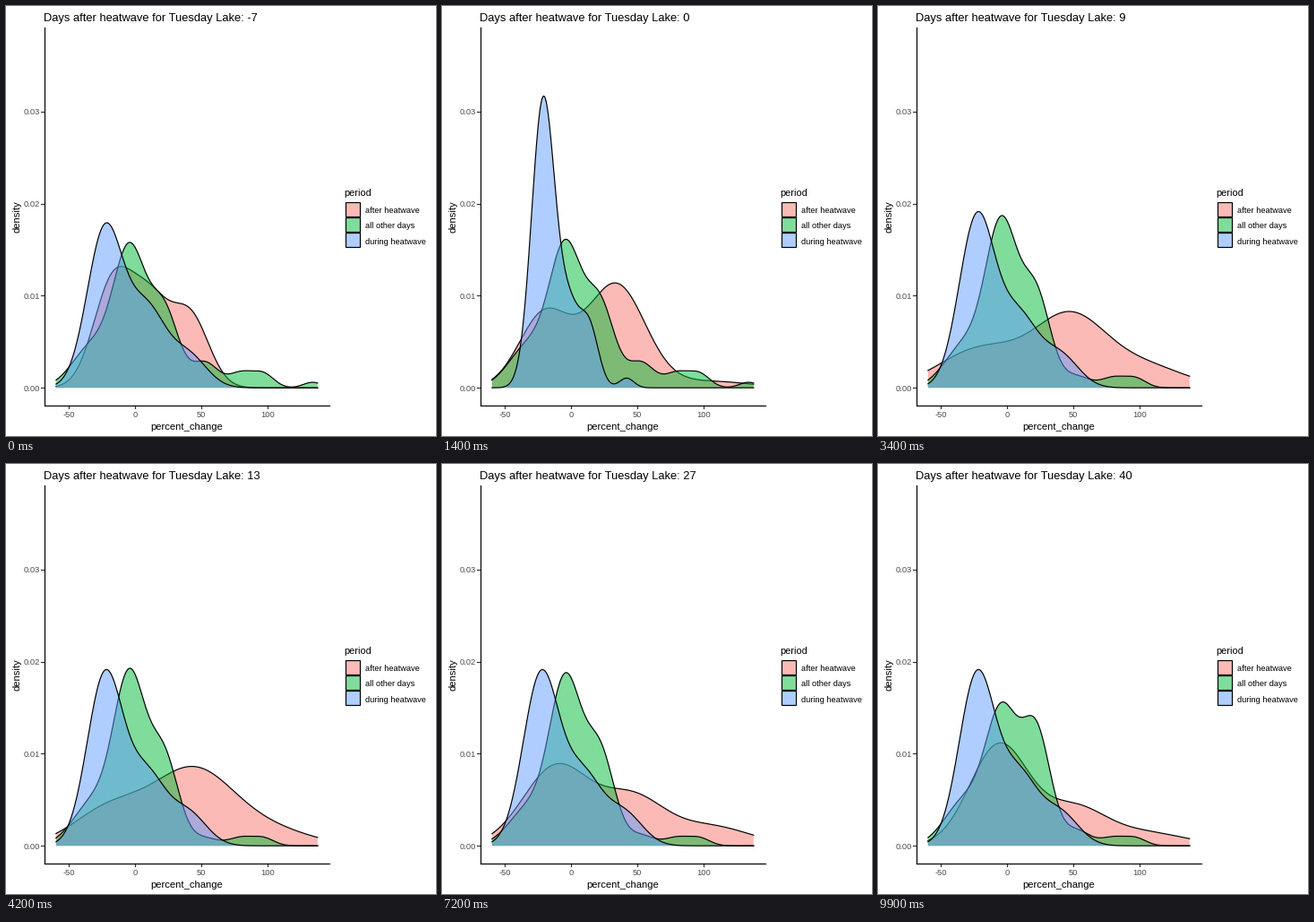
Animation of 480 by 480 pixels, one loop 10 s. Source, as a matplotlib script:

```python
import numpy as np
import matplotlib.pyplot as plt
from matplotlib.animation import FuncAnimation
from matplotlib.patches import Polygon, Rectangle

FRAMES, STEP_MS = 100, 100
FIRST_DAY, LAST_DAY = -7, 40
PX = 0.9  # points per pixel at 80 dpi
GREY = "#4D4D4D"
GRID = np.linspace(-59.5, 137.8, 512)

plt.rcParams["font.family"] = "Liberation Sans"


def hills(*bumps):
    """Sum of Gaussian bumps (height, mean, sd); heights in units of 0.0001."""
    return sum(h * np.exp(-((GRID - m) / sd) ** 2 / 2) for h, m, sd in bumps)


def after(early, late, tail):
    return hills(early, late, (tail, 105, 30))


def other(left, main, right, mid, far):
    return hills((left, -32, 15), (main, -4, 12), (right, 22, 11), (mid, 53, 10),
                 (far, 80, 9), (0.9 * far, 97, 8))


def during_wide(peak, second):
    return hills((peak, -22.5, 13.5), (second, 9, 14), (35, 40, 14))


def during_narrow(peak, sd):
    return hills((peak, -20.8, sd), (78, -1, 8), (62, 14, 7), (10.5, 42, 5.5))


last_bump = hills((6, 134, 7))

# Density shapes at key steps; steps between them are blended.
AFTER = {
    0: hills((110, -17, 14.5), (90, 11, 15), (75, 42, 14)),
    14: after((80, -20, 19), (112, 34, 22), 7),
    26: after((42, -25, 33), (72, 49, 25), 29),
    42: after((38, -20, 27), (82, 44, 31), 15),
    56: after((72, -3, 27), (53, 52, 24), 23),
    72: after((86, -11, 25), (50, 46, 24), 21),
    99: after((109, -6, 22), (40, 50, 24), 14),
}
OTHER = {
    0: other(45, 145, 82, 27, 16) + last_bump,
    14: other(45, 148, 88, 27, 16) + last_bump,
    26: other(45, 167, 104, 16, 13),
    42: other(46, 179, 93, 8, 9),
    56: other(46, 163, 95, 14, 8),
    72: other(40, 175, 98, 11, 9),
    99: other(48, 140, 123, 16, 9),
}
DURING = {
    0: during_wide(172, 82),
    12: during_narrow(365, 7.8),
    14: during_narrow(313, 8.8),
    22: during_wide(185, 74),
    99: during_wide(185, 74),
}
PERIODS = [
    ("after heatwave", "#F8766D", AFTER),
    ("all other days", "#00BA38", OTHER),
    ("during heatwave", "#619CFF", DURING),
]


def blend(shapes, step):
    keys = list(shapes)
    i = min(np.searchsorted(keys, step, side="right"), len(keys) - 1)
    a, b = keys[i - 1], keys[i]
    f = (step - a) / (b - a)
    return shapes[a] * (1 - f) + shapes[b] * f


def to_x(v):
    return 143.9 + 1.48 * v


def to_y(d):
    return 426.2 - 1.028 * d


fig = plt.figure(figsize=(6, 6), dpi=80, facecolor="white")
ax = fig.add_axes([0, 0, 1, 1])
ax.set(xlim=(0, 480), ylim=(480, 0))
ax.axis("off")


def label(x, y, s, size, color="black", **kw):
    return ax.text(x, y, s, fontsize=size * PX, color=color, **kw)


def stroke(xs, ys, color="black", **kw):
    return ax.plot(xs, ys, color=color, lw=1.2 * PX, **kw)[0]


layers = []
for i, (name, color, shapes) in enumerate(PERIODS):
    area = Polygon([[0, 0], [1, 1], [1, 0]], fc=color, alpha=0.5, lw=0, zorder=2 * i + 2)
    ax.add_patch(area)
    layers.append((shapes, area, stroke([], [], zorder=2 * i + 3)))

    top = 218.5 + 17.28 * i
    ax.add_patch(Rectangle((378.5, top), 16, 16, fc=color, alpha=0.5, lw=0))
    ax.add_patch(Rectangle((378.5, top), 16, 16, fc="none", ec="black", lw=1.2 * PX))
    label(401, top + 12.5, name, 9.25)

stroke([42.5, 42.5], [24, 445.5], zorder=10)
stroke([42.5, 361], [445.5, 445.5], zorder=10)
for d in range(0, 301, 100):
    y = to_y(d)
    stroke([39, 42], [y, y], "#333333")
    label(37.7, y + 3.4, f"{d / 1e4:.2f}", 9.4, GREY, ha="right")
for v in (-50, 0, 50, 100):
    x = to_x(v)
    stroke([x, x], [446, 449], "#333333")
    label(x, 459, str(v), 9.4, GREY, ha="center")

label(201.2, 473, "percent_change", 11.3, ha="center")
label(17.3, 235.5, "density", 11.2, rotation=90, ha="right", va="center")
label(377.7, 212, "period", 11)
title = label(42, 17, "", 12.85)


def draw(step):
    day = FIRST_DAY + (LAST_DAY - FIRST_DAY) * step / (FRAMES - 1)
    title.set_text(f"Days after heatwave for Tuesday Lake: {round(day)}")
    xs, base = to_x(GRID), to_y(0)
    for shapes, area, line in layers:
        ys = to_y(blend(shapes, step))
        area.set_xy(np.column_stack([np.r_[xs[0], xs, xs[-1]], np.r_[base, ys, base]]))
        line.set_data(xs, ys)
    return [title]


anim = FuncAnimation(fig, draw, frames=FRAMES, interval=STEP_MS,
                     repeat=True, repeat_delay=0, blit=False)
plt.show()
```
